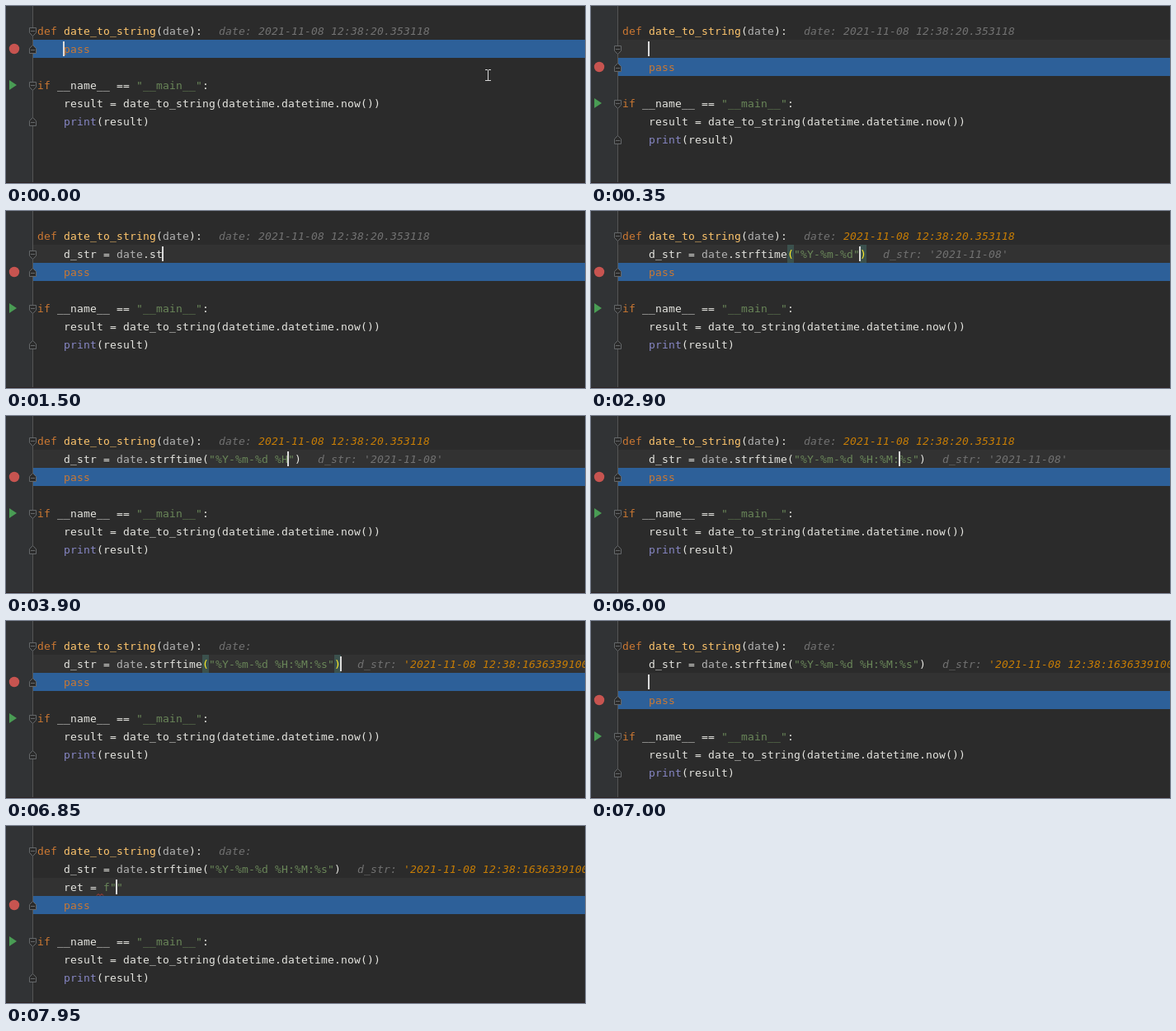
An HTML page with a canvas that plays this animation: 702 by 215 pixels, repeating every 8 s.

```html
<!DOCTYPE html>
<html lang="en">
<head>
<meta charset="utf-8">
<title>Editing code in the debugger</title>
<style>
  html, body { margin: 0; width: 702px; height: 215px; overflow: hidden; background: #2b2b2b; }
  canvas { display: block; }
</style>
</head>
<body>
<canvas id="stage" width="702" height="215"></canvas>
<script>
const ctx = document.getElementById('stage').getContext('2d');
const LOOP = 8000, LEFT = 38, TOP = 19, CELL = 8, ROW = 22, GUTTER = 33, WIDTH = 702;
const FONT = '13px "DejaVu Sans Mono", monospace';
const COLOR = {
  back: '#2b2b2b', gutter: '#313335', current: '#323232', exec: '#2d6099',
  text: '#e6e6e1', keyword: '#cc7832', name: '#ffc66d', string: '#6a8759',
  builtin: '#8888c6', param: '#b4b4b4', hint: '#727272', changed: '#c77d05',
  match: '#ffef28', matchBack: '#3b514d', usage: '#344134', fold: '#65686a',
  caret: '#dcdcdc', stop: '#c75450', run: '#499c54', error: '#bc3f3c'
};
const TOKENS = /f?"[^"]*"|\b(?:def|if|pass)\b|\bprint\b|\bdate\b|[^]/g;
const DATE = '2021-11-08', STAMP = DATE + ' 12:38:20.353118';

// Timeline: each entry is [time, changes to the state].
const events = [];
const at = (time, change) => events.push([time, change]);

// Types the pieces one by one at the given times, moving the caret along.
function type(line, row, before, pieces, times, after = '') {
  times.forEach((time, i) => {
    before += pieces[i];
    at(time, { [line]: before + after, row, col: 4 + before.length });
  });
  return before;
}

at(0, {
  first: null, second: null, row: 1, col: 4, current: 1, foldRow: 0, mouse: true,
  match: false, usage: false, squiggle: false, caret: true,
  date: STAMP, dateColor: COLOR.hint, value: '', valueColor: COLOR.hint
});
at(200, { row: 0, current: 0, mouse: false });
at(300, { col: 25 });
at(350, { first: '', row: 1, col: 4, current: 1, foldRow: 1 });

let code = type('first', 1, '', ['d', '_', 's', 't', 'r', ' ', '= '],
  [500, 600, 650, 700, 800, 850, 950]);
code = type('first', 1, code, 'date', [1100, 1150, 1200, 1250]);
at(1300, { usage: true });
at(1400, { usage: false });
code = type('first', 1, code, '.strftime',
  [1400, 1450, 1500, 1550, 1650, 1750, 1850, 1950, 2000]);
code = type('first', 1, code, '(', [2100], ')');
at(2150, { match: true });

code = type('first', 1, code, ['"%Y-%m-%d"'], [2300], ')');
at(2300, { foldRow: 0 });
at(2550, { row: 2, col: 0, match: false, dateColor: COLOR.changed });
at(2750, { row: 1, col: 4 + code.length, value: `'${DATE}'` });
at(2900, { match: true });

code = code.slice(0, -1);
at(3150, { col: 4 + code.length, match: false });
code = type('first', 1, code, ' %H:%M', [3350, 3750, 3900, 4350, 4600, 4750], '")');
type('first', 1, code, '%s', [5250, 5600], '")');
at(5800, { col: 5 + code.length });
at(5850, { col: 4 + code.length });
code = type('first', 1, code, ':', [6000], '%s")');

at(6250, { row: 2, col: 0, date: '' });
at(6300, { current: 2, value: `'${DATE} 12:38:1636339100'`, valueColor: COLOR.changed });
at(6550, { caret: false });
at(6750, { row: 1, current: 1, caret: true });
at(6850, { col: 8 + code.length, match: true });
at(7000, { second: '', row: 2, col: 4, current: 2, match: false });
code = type('second', 2, '', 'ret = ', [7350, 7400, 7450, 7500, 7550, 7600]);
code = type('second', 2, code, 'f', [7750]);
type('second', 2, code, '"', [7900], '"');
at(7950, { squiggle: true });

const stateAt = time =>
  Object.assign({}, ...events.filter(([start]) => start <= time).map(([, change]) => change));

const rowTop = row => TOP + row * ROW;
const colX = col => LEFT + col * CELL;

function box(color, x, y, w, h) {
  ctx.fillStyle = color;
  ctx.fillRect(x, y, w, h);
}

function text(str, x, row, color) {
  ctx.fillStyle = color;
  [...str].forEach((ch, i) => ctx.fillText(ch, x + i * CELL, rowTop(row) + 16));
}

function tokenColor(token) {
  if (/^f?"/.test(token)) return COLOR.string;
  if (/^(def|if|pass)$/.test(token)) return COLOR.keyword;
  if (token === 'print') return COLOR.builtin;
  return token === 'date' ? COLOR.param : COLOR.text;
}

function codeLine(str, row, indent = 4) {
  ctx.font = FONT;
  let x = colX(indent);
  for (const token of str.match(TOKENS) || []) {
    text(token, x, row, tokenColor(token));
    x += token.length * CELL;
  }
}

function hint(label, value, color, endCol, row) {
  ctx.font = 'italic ' + FONT;
  const x = colX(endCol) + 20;
  text(label, x, row, COLOR.hint);
  text(value, x + (label.length + 1) * CELL, row, color);
}

function polygon(points) {
  ctx.beginPath();
  points.forEach(([x, y]) => ctx.lineTo(x, y));
  ctx.closePath();
}

function fold(row, end) {
  const dir = end ? -1 : 1;
  const base = rowTop(row) + (end ? 16.5 : 7.5);
  polygon([[28.5, base], [36.5, base], [36.5, base + 6 * dir],
    [32.5, base + 10 * dir], [28.5, base + 6 * dir]]);
  ctx.fillStyle = COLOR.back;
  ctx.fill();
  ctx.strokeStyle = COLOR.fold;
  ctx.lineWidth = 1;
  ctx.stroke();
  box(COLOR.fold, 30, base + 4 * dir - 0.5, 5, 1);
}

function matchedBrace(ch, col, row) {
  box(COLOR.matchBack, colX(col), rowTop(row), CELL, ROW);
  ctx.font = FONT;
  text(ch, colX(col), row, COLOR.match);
}

function gutterIcons(passRow, ifRow, foldRow) {
  ctx.fillStyle = COLOR.stop;
  ctx.beginPath();
  ctx.arc(10, rowTop(passRow) + 11, 6.2, 0, Math.PI * 2);
  ctx.fill();
  const y = rowTop(ifRow);
  polygon([[4, y + 5], [13, y + 11], [4, y + 17]]);
  ctx.fillStyle = COLOR.run;
  ctx.fill();
  fold(foldRow, false);
  fold(passRow, true);
  fold(ifRow, false);
  fold(ifRow + 2, true);
}

function squiggle(x, y) {
  ctx.beginPath();
  for (let i = 0; i <= 4; i++) ctx.lineTo(x + i * 2, y + (i % 2 ? -1 : 1));
  ctx.strokeStyle = COLOR.error;
  ctx.lineWidth = 1;
  ctx.stroke();
}

function mouse(x, y) {
  box('#d8d8d8', x, y - 6, 1, 13);
  for (const end of [y - 7, y + 6]) {
    box('#d8d8d8', x - 3, end, 3, 1);
    box('#d8d8d8', x + 1, end, 3, 1);
  }
}

function draw(time) {
  const s = stateAt(time);
  const passRow = 1 + (s.first !== null) + (s.second !== null);
  const ifRow = passRow + 2;

  box(COLOR.back, 0, 0, WIDTH, 215);
  box(COLOR.gutter, 0, 0, 32, 215);
  box(COLOR.current, GUTTER, rowTop(s.current), WIDTH - GUTTER, ROW);
  box(COLOR.exec, GUTTER, rowTop(passRow), WIDTH - GUTTER, ROW);
  box('#555555', 32, 0, 1, 215);
  box('#2e2526', 0, 214, WIDTH, 1);
  gutterIcons(passRow, ifRow, s.foldRow);

  if (s.usage) box(COLOR.usage, colX(19), rowTop(0), 4 * CELL, ROW);
  codeLine('def ', 0, 0);
  text('date_to_string', colX(4), 0, COLOR.name);
  codeLine('(date):', 0, 18);
  hint('date:', s.date, s.dateColor, 25, 0);

  if (s.first !== null) {
    const end = 4 + s.first.length;
    codeLine(s.first, 1);
    if (s.match) {
      matchedBrace('(', 4 + s.first.indexOf('('), 1);
      matchedBrace(')', end - 1, 1);
    }
    if (s.value) hint('d_str:', s.value, s.valueColor, end, 1);
  }
  if (s.second !== null) codeLine(s.second, 2);
  if (s.squiggle) squiggle(110, rowTop(2) + 20.5);

  codeLine('pass', passRow);
  codeLine('if __name__ == "__main__":', ifRow, 0);
  codeLine('result = date_to_string(datetime.datetime.now())', ifRow + 1);
  codeLine('print(result)', ifRow + 2);

  if (s.caret) box(COLOR.caret, Math.max(LEFT, colX(s.col) - 1), rowTop(s.row) + 2, 2, 18);
  if (s.mouse) mouse(584, 84);
}

const start = performance.now();
function tick() {
  draw((performance.now() - start) % LOOP);
  requestAnimationFrame(tick);
}
tick();
</script>
</body>
</html>
```
